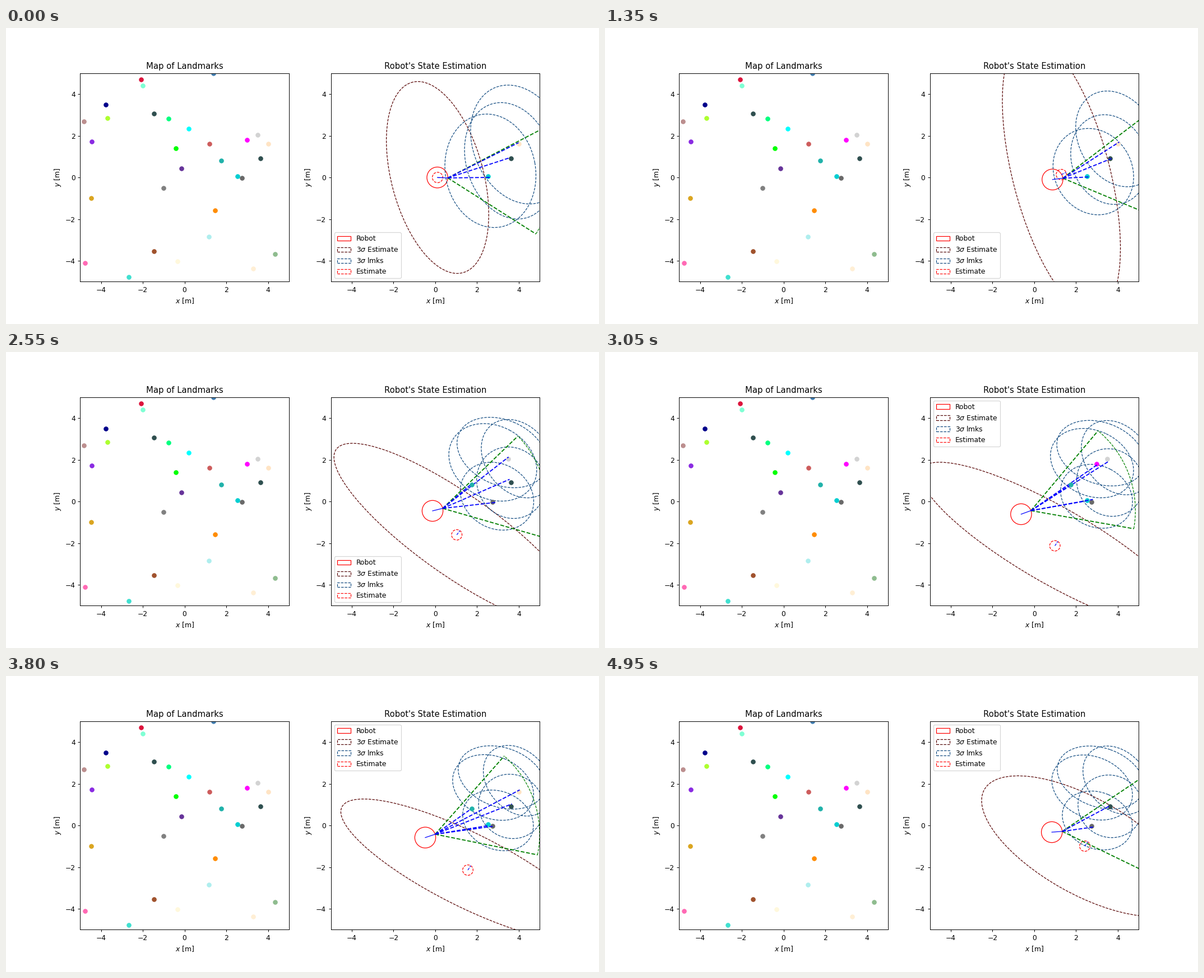
A matplotlib script for the animation above (5000 ms loop, 1058x529 px).

```python
import numpy as np
import matplotlib.pyplot as plt
from matplotlib.animation import FuncAnimation
from matplotlib.patches import Circle, Ellipse, Patch

FRAMES, INTERVAL = 100, 50
ROBOT_RADIUS, ESTIMATE_RADIUS = 0.5, 0.25
SENSOR_RANGE, HALF_FOV = 5.0, np.radians(30)
DETECTION_RATE, NOISE = 0.72, 0.08
POSE_COLOR, LANDMARK_COLOR = "#550000", "#104a80"
LEGEND_BOTTOM = 2.69

LANDMARKS = [
    (-2.08, 4.71, "crimson"), (-2.01, 4.41, "aquamarine"),
    (1.39, 4.99, "steelblue"), (-3.78, 3.49, "darkblue"),
    (-1.46, 3.06, "darkslategray"), (-3.69, 2.86, "greenyellow"),
    (-0.78, 2.83, "springgreen"), (-4.82, 2.69, "rosybrown"),
    (0.19, 2.33, "cyan"), (-4.43, 1.72, "blueviolet"),
    (-0.43, 1.41, "lime"), (1.19, 1.62, "indianred"),
    (2.99, 1.81, "magenta"), (3.5, 2.03, "lightgray"),
    (4.0, 1.62, "bisque"), (3.62, 0.92, "darkslategray"),
    (1.75, 0.8, "lightseagreen"), (-0.15, 0.42, "rebeccapurple"),
    (2.53, 0.06, "darkturquoise"), (2.75, -0.03, "dimgray"),
    (-1.0, -0.5, "gray"), (-4.47, -0.98, "goldenrod"),
    (1.46, -1.59, "darkorange"), (1.17, -2.85, "paleturquoise"),
    (-1.46, -3.53, "sienna"), (-4.76, -4.1, "hotpink"),
    (-0.35, -4.03, "cornsilk"), (-2.67, -4.78, "turquoise"),
    (3.29, -4.38, "papayawhip"), (4.33, -3.67, "darkseagreen"),
]


def track(*keys):
    """Smooth cubic path through keys of the form (step, values...)."""
    keys = np.array(keys, float)
    t, p = keys[:, 0], keys[:, 1:]
    slope = np.gradient(p, t, axis=0)

    def at(n):
        i = int(np.clip(np.searchsorted(t, n, "right") - 1, 0, len(t) - 2))
        h = t[i + 1] - t[i]
        s = (n - t[i]) / h
        return ((1 + 2 * s) * (1 - s) ** 2 * p[i] + s * (1 - s) ** 2 * h * slope[i]
                + s * s * (3 - 2 * s) * p[i + 1] + s * s * (s - 1) * h * slope[i + 1])
    return at


def shrink(start, tau, first, last):
    """Belief that settles from its first to its last shape."""
    first, last = np.array(first), np.array(last)

    def at(n):
        if n < start:
            return None
        return last + (first - last) * np.exp(-((n - start) / tau) ** 1.5)
    return at


# Waypoints: step, x, y, heading in degrees
robot_at = track(
    (0, 0.10, 0.00, -2.5), (16, 0.67, -0.09, -4), (25, 0.88, -0.09, 5),
    (38, 0.54, -0.20, 19.3), (51, -0.13, -0.45, 13.9), (61, -0.63, -0.61, 20),
    (68, -0.79, -0.67, 20.5), (76, -0.48, -0.58, 18.6), (99, 0.84, -0.32, 4.1))

# Drift from the robot and 3-sigma shape:
# step, dx, dy, half width, half height, x shift of the top point
estimate_at = track(
    (0, 0.01, 0.00, 2.45, 4.60, -0.94), (16, 0.44, 0.37, 2.71, 8.00, -0.95),
    (38, 0.50, -0.21, 3.51, 4.59, -2.65), (51, 1.16, -1.15, 5.88, 4.39, -4.99),
    (76, 2.04, -1.56, 6.08, 3.41, -4.99), (99, 1.58, -0.67, 4.94, 3.37, -3.20))

# Each shape: x, y, half width, half height, x shift of the top point
BELIEFS = [
    shrink(0, 35, (2.64, 0.32, 2.18, 2.72, -0.18), (3.02, 0.24, 1.67, 1.40, -0.30)),
    shrink(0, 35, (3.55, 0.80, 2.15, 2.79, -0.40), (3.64, 0.92, 1.54, 1.49, -0.07)),
    shrink(0, 38, (4.00, 1.58, 2.31, 2.85, -0.51), (3.94, 2.18, 1.60, 1.62, -0.45)),
    shrink(31, 17, (3.25, 2.47, 2.36, 2.15, -0.70), (3.17, 2.30, 2.07, 1.51, -0.53)),
    shrink(31, 17, (2.71, 2.02, 2.55, 2.63, -0.38), (2.77, 1.82, 1.93, 1.56, -0.43)),
]

# dpi a hair above 1058 / 12, so rounding never loses a pixel
fig, (map_ax, state_ax) = plt.subplots(1, 2, figsize=(12, 6), dpi=88.17)
for ax, title in ((map_ax, "Map of Landmarks"), (state_ax, "Robot's State Estimation")):
    ax.set(xlim=(-5, 5), ylim=(-5, 5), aspect="equal", title=title,
           xlabel="$x$ [m]", ylabel="$y$ [m]")
for x, y, color in LANDMARKS:
    map_ax.plot(x, y, "o", color=color)


def outline(color, style, label):
    return Patch(fill=False, edgecolor=color, linestyle=style, label=label)


legend = state_ax.legend(handles=[
    outline("red", "-", "Robot"),
    outline(POSE_COLOR, "--", r"$3\sigma$ Estimate"),
    outline(LANDMARK_COLOR, "--", r"$3\sigma$ lmks"),
    outline("red", "--", "Estimate")], loc="lower left")

moving = []


def add(patch):
    moving.append(state_ax.add_patch(patch))


def line(points, style, **kwargs):
    moving.extend(state_ax.plot(*np.transpose(points), style, **kwargs))


def add_ellipse(x, y, half_w, half_h, top_shift, color):
    cross = top_shift * half_h
    values, vectors = np.linalg.eigh([[half_w ** 2, cross], [cross, half_h ** 2]])
    minor, major = 2 * np.sqrt(values)
    angle = np.degrees(np.arctan2(vectors[1, 1], vectors[0, 1]))
    add(Ellipse((x, y), major, minor, angle=angle, fill=False, edgecolor=color, ls="--"))


def ray(origin, angle, length):
    return np.asarray(origin) + length * np.stack([np.cos(angle), np.sin(angle)], -1)


def add_body(center, heading, radius, style):
    nose = ray(center, heading, radius)
    add(Circle(center, radius, fill=False, edgecolor="red", ls=style))
    line([center, nose], "b" + style, lw=1)
    return nose


def detections(n, apex, heading):
    rng = np.random.default_rng(n)
    for x, y, color in LANDMARKS:
        dx, dy = x - apex[0], y - apex[1]
        bearing = np.arctan2(dy, dx) - heading
        bearing = (bearing + np.pi) % (2 * np.pi) - np.pi
        in_view = np.hypot(dx, dy) < SENSOR_RANGE and abs(bearing) < HALF_FOV
        if in_view and rng.random() < DETECTION_RATE:
            yield (x, y), color, (x, y) + rng.normal(0, NOISE, 2)


def update(n):
    while moving:
        moving.pop().remove()

    x, y, degrees = robot_at(n)
    heading = np.radians(degrees)
    apex = add_body((x, y), heading, ROBOT_RADIUS, "-")

    dx, dy, *shape = estimate_at(n)
    ex, ey = x + dx, y + dy
    turn = min(n / 60, 1)
    add_body((ex, ey), np.radians(57 * turn ** 2 * (3 - 2 * turn)), ESTIMATE_RADIUS, "--")
    add_ellipse(ex, ey, *shape, POSE_COLOR)
    for belief_at in BELIEFS:
        belief = belief_at(n)
        if belief is not None:
            add_ellipse(*belief, LANDMARK_COLOR)

    sweep = heading + np.linspace(-HALF_FOV, HALF_FOV, 40)
    arc = ray(apex, sweep, SENSOR_RANGE)
    line([apex, arc[0]], "g--", lw=1.5)
    line([apex, arc[-1]], "g--", lw=1.5)
    line(arc, "g--", lw=1)

    for spot, color, measured in detections(n, apex, heading):
        line([spot], "o", color=color)
        line([apex, measured], "b--", lw=1.5)

    # The legend moves up once the pose ellipse leaves that corner free.
    top = ey + shape[1]
    legend.set_loc("upper left" if top < LEGEND_BOTTOM else "lower left")
    return moving


anim = FuncAnimation(fig, update, frames=FRAMES, interval=INTERVAL,
                     init_func=lambda: [], repeat=True, repeat_delay=0, blit=False)
plt.show()
```
